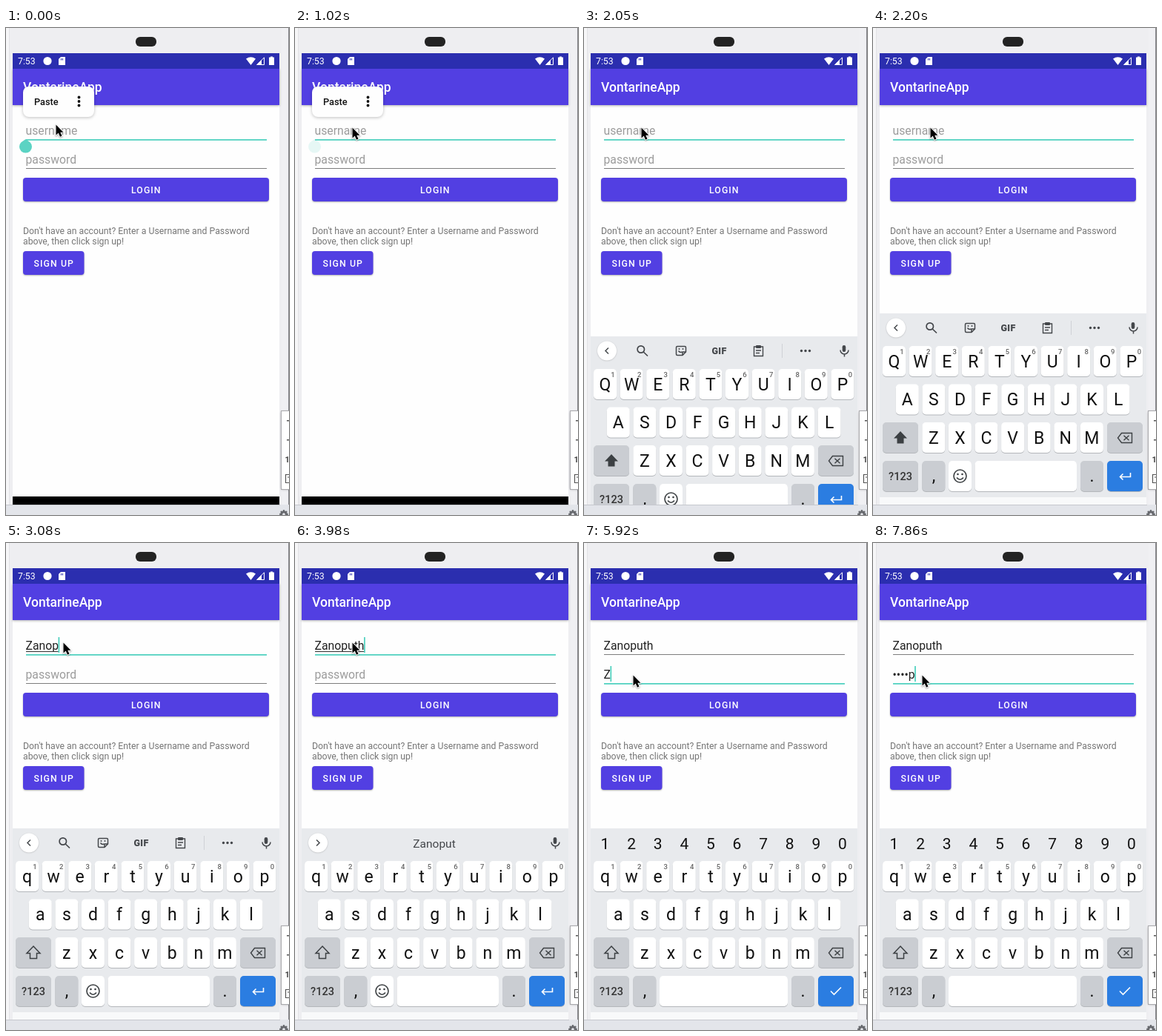
Write an HTML page with a canvas that moves like this. It is 382 px wide and 657 px high and loops after 8 s.

```html
<!DOCTYPE html>
<html lang="en">
<head>
<meta charset="utf-8">
<title>Sign-in screen</title>
<style>
  html, body { margin: 0; width: 100%; height: 100%; overflow: hidden; background: #eeeef1; }
  canvas { display: block; width: 382px; height: 657px; }
</style>
</head>
<body>
<canvas id="stage"></canvas>
<script>
const canvas = document.getElementById('stage');
const ctx = canvas.getContext('2d');
const ratio = window.devicePixelRatio || 1;
canvas.width = 382 * ratio;
canvas.height = 657 * ratio;

const LOOP = 8000;
const PURPLE = '#523fe2', TEAL = '#4fd1bf', KEY_GREY = '#cacdd2', INK = '#44474b';
const NAME = 'Zanoputh';

// Timelines: [start, value], each value holds until the next start.
const pointer = [[0, [67, 130]], [140, [69, 131]], [290, [72, 132]], [430, [75, 133]], [580, [77, 134]],
  [4430, [76, 140]], [4580, [73, 154]], [4720, [69, 170]], [4870, [66, 178]]];
const handleAlpha = [[0, 1], [1020, .15], [1160, 0]];
const keyboardDrop = [[0, 260], [1910, 150], [2050, 31], [2200, 0]];
const nameLength = [[0, 0], [2490, 1], [2640, 2], [2790, 3], [2930, 4], [3080, 5], [3380, 6], [3830, 7], [3980, 8]];
const hintLength = [[0, 0], [3230, 5], [3530, 6], [3980, 7], [4280, 8]];
const passLength = [[0, 0], [5920, 1], [6370, 2], [6820, 3], [7420, 4], [7860, 5]];
const caretOn = [[0, 0], [290, 1], [870, 0], [1310, 1], [1910, 0], [2350, 1], [4430, 0],
  [5020, 1], [5470, 0], [5920, 1], [7270, 0], [7420, 1]];
const PASSWORD_FOCUS = 5020;

function at(track, t) {
  let value = track[0][1];
  for (const [start, v] of track) if (t >= start) value = v;
  return value;
}

function rect(x, y, w, h, color, radius = 0) {
  ctx.fillStyle = color;
  ctx.beginPath();
  ctx.roundRect(x, y, w, h, radius);
  ctx.fill();
}

function dot(x, y, r, color) {
  ctx.fillStyle = color;
  ctx.beginPath();
  ctx.arc(x, y, r, 0, Math.PI * 2);
  ctx.fill();
}

function text(str, x, y, size, color, { weight = 400, align = 'left', spacing = 0 } = {}) {
  ctx.font = `${weight} ${size}px Roboto, sans-serif`;
  ctx.letterSpacing = spacing + 'px';
  ctx.textAlign = align;
  ctx.fillStyle = color;
  ctx.fillText(str, x, y);
  return ctx.measureText(str).width;
}

function fill(d, color) {
  ctx.fillStyle = color;
  ctx.fill(new Path2D(d));
}

function line(d, color, width = 1.5) {
  ctx.strokeStyle = color;
  ctx.lineWidth = width;
  ctx.stroke(new Path2D(d));
}

function shadowed(blur, dy, alpha, draw) {
  ctx.save();
  ctx.shadowColor = `rgba(0,0,0,${alpha})`;
  ctx.shadowBlur = blur * ratio;
  ctx.shadowOffsetY = dy * ratio;
  draw();
  ctx.restore();
}

function drawDevice() {
  rect(0, 0, 382, 657, '#eeeef1');
  rect(0, 0, 4, 643, '#f6f6f8');
  rect(4, 0, 1, 643, '#e2e2e6');
  rect(372, 0, 9, 643, '#f0f0f3');
  rect(381, 0, 1, 643, '#85858a');
  rect(175, 12, 28, 13, '#232323', 6);
  rect(9, 34, 360, 609, '#fefefe');
  rect(9, 632, 360, 11, '#000');
}

function drawAppBar() {
  shadowed(3, 1, .3, () => rect(9, 55, 360, 49, PURPLE));
  rect(9, 34, 360, 21, '#2b2eaf');
  text('7:53', 16, 49, 12.25, '#fff');
  dot(56, 44.5, 5.6, '#fff');
  fill('M74 39H80V50H71V42Z', '#fff');
  rect(74, 41, 1, 2.5, '#2b2eaf');
  rect(76, 41, 1, 2.5, '#2b2eaf');
  fill('M324 41.5Q330.500 37 337 41.500L330.500 50Z', '#fff');
  line('M338.800 49.500L348.500 39.800V49.500Z', '#fff', 1);
  fill('M338 50L345 43V50Z', '#fff');
  fill('M355 39.500H357V38.500H360V39.500H362V50H355Z', '#fff');
  text('VontarineApp', 23, 86, 17.5, '#fff', { weight: 500 });
}

function drawButton(label, x, y, w, labelX) {
  shadowed(2, 1, .3, () => rect(x, y, w, 32, PURPLE, 4));
  text(label, labelX, y + 20.5, 12.25, '#fff', { weight: 500, spacing: 1.09 });
}

function drawField(value, hint, baseline, focused, caret, composing) {
  const width = value ? text(value, 26.5, baseline, 15.75, '#212121') : 0;
  if (!value) text(hint, 26.5, baseline, 15.75, '#9c9c9c');
  if (composing) rect(27, baseline + 2, width, 1, '#333');
  if (focused) rect(27, baseline + 6, 325, 1.75, TEAL);
  else rect(27, baseline + 6, 325, 1, '#7d7d7d');
  if (focused && caret) rect(26 + width, baseline - 17, 1.75, 21, TEAL);
}

function drawForm(t) {
  const onPassword = t >= PASSWORD_FOCUS;
  const caret = at(caretOn, t);
  const name = NAME.slice(0, at(nameLength, t));
  const count = at(passLength, t);
  const pass = count ? '•'.repeat(count - 1) + NAME[count - 1] : '';
  drawField(name, 'username', 144, !onPassword, caret, name && !onPassword);
  drawField(pass, 'password', 183, onPassword, caret, false);
  drawButton('LOGIN', 23, 202, 332, 169);
  text("Don't have an account? Enter a Username and Password", 23, 278, 12.25, '#757575');
  text('above, then click sign up!', 23, 292, 12.25, '#757575');
  drawButton('SIGN UP', 23, 301, 82.5, 37.500);
}

function drawPastePopup(t) {
  if (t >= 1160) return;
  ctx.globalAlpha = at(handleAlpha, t);
  fill('M26.500 150L32.600 154.200A8.500 8.500 0 1 1 20.400 154.200Z', '#5bd3c3');
  ctx.globalAlpha = 1;
  shadowed(4, 1, .25, () => rect(23, 79, 96, 41, '#fefefe', 8));
  text('Paste', 38, 104, 12.75, '#111', { weight: 500 });
  for (const y of [93.5, 99, 104.5]) dot(98.5, y, 1.9, '#111');
}

function key(x, y, w, color = '#fff') {
  rect(x, y + 1, w, 41, '#b4b7bb', 5);
  rect(x, y, w, 41, color, 5);
}

function drawMic() {
  rect(348.700, 397, 4.600, 9, INK, 2.300);
  line('M346 403.500A5.500 5.500 0 0 0 357 403.500M351.500 409V412.500', INK);
}

function drawToolbar(t) {
  const suggestion = NAME.slice(0, at(hintLength, t));
  shadowed(2, .5, .2, () => dot(31, 404.5, 13, '#fff'));
  line(suggestion ? 'M29 400.500L33 404.500L29 408.500' : 'M33 400.500L29 404.500L33 408.500', INK);
  drawMic();
  if (suggestion) {
    text(suggestion, 188, 410.5, 15.5, INK, { align: 'center' });
    return;
  }
  line('M81.500 402.500A4.700 4.700 0 1 1 72.100 402.500A4.700 4.700 0 1 1 81.500 402.500M80.200 406L86 411.500', INK, 1.7);
  line('M126 398.500H136Q137.500 398.500 137.500 400V406L133 410.500H126Q124.500 410.500 124.500 409V400Q124.500 398.500 126 398.500ZM133 410V406H137.500M127.500 404.500Q129.500 407.500 132 406', INK);
  dot(128.5, 402, 1, INK);
  dot(133.5, 402, 1, INK);
  text('GIF', 182.5, 409, 12.5, INK, { weight: 900, align: 'center', spacing: .3 });
  line('M229.500 399H241.500V411.500H229.500ZM232 404H239M232 407.500H237', INK, 1.4);
  rect(232, 397, 7, 4, INK, 1);
  rect(267, 395, 1, 19, '#cfd2d6');
  for (const x of [293.5, 299, 304.5]) dot(x, 404.5, 1.7, INK);
}

function drawLetters(letters, left, y, upper, digits) {
  [...letters].forEach((letter, i) => {
    const x = left + i * 35.6;
    key(x, y, 31);
    text(upper ? letter.toUpperCase() : letter, x + 15.5, y + 28.5, 23, '#111', { align: 'center' });
    if (digits) text(String((i + 1) % 10), x + 26, y + 11, 9.5, '#666', { weight: 500, align: 'center' });
  });
}

function drawKeyboard(t) {
  const drop = at(keyboardDrop, t);
  if (drop >= 260) return;
  const onPassword = t >= PASSWORD_FOCUS;
  const upper = at(nameLength, t) === 0;

  ctx.save();
  ctx.beginPath();
  ctx.rect(9, 104, 360, 539);
  ctx.clip();
  ctx.translate(0, drop);
  rect(9, 385, 360, 248, '#e8eaed');
  rect(9, 633, 360, 10, '#f8f9fa');

  if (onPassword) {
    for (let i = 0; i < 10; i++)
      text(String((i + 1) % 10), 28.5 + i * 35.6, 413, 21, '#111', { align: 'center' });
  } else drawToolbar(t);

  drawLetters('qwertyuiop', 13, 429, upper, !onPassword || true);
  drawLetters('asdfghjkl', 30.8, 480.5, upper);
  drawLetters('zxcvbnm', 66.3, 532, upper);

  key(13, 532, 48, KEY_GREY);
  const arrow = 'M37 544L46 553.500H41.500V560.500H32.500V553.500H28Z';
  if (upper) fill(arrow, '#3c4043');
  else line(arrow, '#3c4043');
  key(316, 532, 48, KEY_GREY);
  line('M335.500 546.500H349.500V559.500H335.500L330.500 553ZM338.500 549.700L345.500 556.300M345.500 549.700L338.500 556.300', '#3c4043', 1.4);

  key(13, 584, 48, KEY_GREY);
  text('?123', 37, 610, 14.5, '#333', { weight: 500, align: 'center' });
  key(66.3, 584, 31, KEY_GREY);
  text(',', 82, 612, 23, '#111', { align: 'center' });
  if (onPassword) key(102, 584, 173);
  else {
    key(102, 584, 31);
    line('M126 604.500A8.500 8.500 0 1 1 109 604.500A8.500 8.500 0 1 1 126 604.500M113 606.500Q117.500 612 122 606.500', '#3c4043', 1.6);
    dot(114.5, 602, 1.3, '#3c4043');
    dot(120.5, 602, 1.3, '#3c4043');
    key(137.5, 584, 137.5);
  }
  key(280, 584, 31, KEY_GREY);
  text('.', 295.5, 612, 23, '#111', { align: 'center' });
  key(316, 584, 48, '#2b7de1');
  line(onPassword ? 'M333 604.500L337.500 609L347 599.500'
    : 'M347.500 600V605.500H333.500M337.500 601.500L333.500 605.500L337.500 609.500', '#fff', 1.6);
  ctx.restore();
}

function drawSidePanel() {
  rect(0, 643, 382, 14, '#e3e5ea');
  rect(0, 643, 370, 1, '#c6c8ce');
  shadowed(3, 1, .25, () => rect(371, 516, 20, 106, '#fff', 3));
  ctx.strokeStyle = '#a9a9ad';
  ctx.lineWidth = 1;
  ctx.strokeRect(371.5, 516.5, 20, 106);
  rect(379, 529, 3, 1.5, '#555');
  rect(379, 555, 3, 1.5, '#555');
  text('1', 376.5, 586, 11, '#444', { weight: 700 });
  line('M385 602.500H377.500V613.500H385M380 606H385', '#555', 1.2);
  for (let i = 0; i < 8; i++) {
    const a = i * Math.PI / 4;
    dot(375 + Math.cos(a) * 4.5, 656 + Math.sin(a) * 4.5, 1.4, '#66686d');
  }
  dot(375, 656, 4.3, '#66686d');
  dot(375, 656, 1.8, '#e3e5ea');
}

function drawPointer(t) {
  const [x, y] = at(pointer, t);
  ctx.save();
  ctx.translate(x, y);
  ctx.lineJoin = 'round';
  const shape = 'M.500 .500V14.500L3.700 11.600L6 16.700L8.500 15.600L6.300 10.700H10.500Z';
  shadowed(2, 1, .35, () => line(shape, '#fff', 2));
  fill(shape, '#000');
  ctx.restore();
}

function frame() {
  const t = performance.now() % LOOP;
  ctx.setTransform(ratio, 0, 0, ratio, 0, 0);
  drawDevice();
  drawAppBar();
  drawForm(t);
  drawPastePopup(t);
  drawKeyboard(t);
  drawSidePanel();
  drawPointer(t);
  requestAnimationFrame(frame);
}
frame();
</script>
</body>
</html>
```
